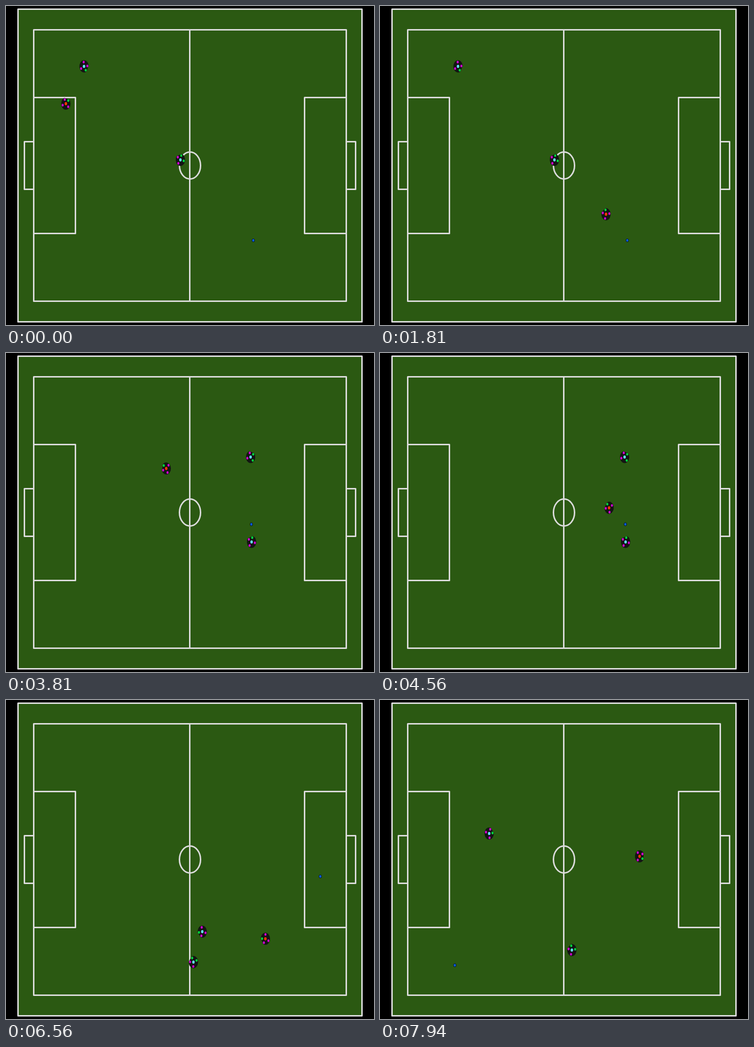
Recreate the animation shown at these times as an HTML page with a canvas. Size 750x650 px, loop 8 s.

```html
<!DOCTYPE html>
<html lang="en">
<head>
<meta charset="utf-8">
<title>Robot soccer</title>
<style>
  html, body { margin: 0; width: 100%; height: 100%; overflow: hidden; background: #000; }
  canvas { display: block; }
</style>
</head>
<body>
<canvas width="750" height="650"></canvas>
<script>
const ctx = document.querySelector('canvas').getContext('2d');
const LOOP = 8000, STEP = 62.5, EPISODE_STEPS = 39;
const WIDTH = 750, HEIGHT = 650, CENTER_X = 375, CENTER_Y = 325;
const ROBOT_RADIUS = 9.5, Y_STRETCH = 1.3;
const RED = '#ff3800', CYAN = '#62e4fa', MAGENTA = '#d000d0', GREEN = '#00d83c';
const FRONT = 32.6, BACK = 122.6; // marker angles from the heading, in degrees

// The red robot drives along a cubic Bezier curve while it turns between two headings.
const episodes = [
  { ball: [504, 477.5], curve: [[122, 199], [220, 342], [444, 361], [516, 485]], turn: [283, 212],
    oneGreen: [159, 123, 27], twoGreen: [355.5, 313.5, 251] },
  { ball: [500, 349], curve: [[75.5, 156], [225, 205], [348, 216], [497, 339]], turn: [162, 210],
    oneGreen: [500.5, 385, 249], twoGreen: [498.5, 212, 288] },
  { ball: [640.5, 359.5], curve: [[155, 568], [334, 608], [499, 569], [633, 364]], turn: [163, 143],
    oneGreen: [400, 472, 138], twoGreen: [382, 534, 215] },
  { ball: [152.5, 540.5], curve: [[598.5, 263], [492, 348], [385, 434], [279, 519]], turn: [0, 0],
    oneGreen: [222.5, 272, 321], twoGreen: [391, 509.5, 227] },
];

const mix = (a, b, u) => a + (b - a) * u;
const drive = u => mix(u, u * u * (3 - 2 * u), 0.5); // gentle start and stop

// De Casteljau: blend neighbouring points until one is left.
function pointOn(points, u) {
  if (points.length === 1) return points[0];
  const blended = points.slice(1).map(([x, y], i) => [mix(points[i][0], x, u), mix(points[i][1], y, u)]);
  return pointOn(blended, u);
}

function dot(x, y, radius, color) {
  ctx.fillStyle = color;
  ctx.beginPath();
  ctx.arc(x, y, radius, 0, 2 * Math.PI);
  ctx.fill();
}

function drawRobot([x, y, heading], center, greens) {
  const rad = degrees => (heading + degrees) * Math.PI / 180;
  ctx.save();
  ctx.translate(x, y);
  ctx.scale(1, Y_STRETCH);
  ctx.fillStyle = '#141414';
  ctx.beginPath();
  ctx.arc(0, 0, ROBOT_RADIUS, rad(FRONT), rad(-FRONT)); // flat front
  ctx.fill();
  [FRONT, BACK, -BACK, -FRONT].forEach((angle, i) => {
    const reach = ROBOT_RADIUS * 0.72;
    dot(reach * Math.cos(rad(angle)), reach * Math.sin(rad(angle)), 2.1, i < greens ? GREEN : MAGENTA);
  });
  dot(0, 0, 2.5, center);
  ctx.restore();
}

function drawBall([x, y]) {
  ctx.save();
  ctx.translate(x, y);
  ctx.scale(1, 1.2);
  dot(0, 0, 3, '#06142a');
  dot(0, 0, 2.2, '#0a5ce0');
  ctx.restore();
}

function drawField() {
  ctx.fillStyle = '#000';
  ctx.fillRect(0, 0, WIDTH, HEIGHT);
  ctx.fillStyle = '#2b5912';
  ctx.fillRect(24, 6, 702, 638);
  ctx.strokeStyle = '#dcdcdc';
  ctx.lineWidth = 3;
  ctx.lineJoin = 'round';
  ctx.beginPath();
  ctx.rect(24.5, 6.5, 701, 637);
  ctx.rect(56.5, 48.5, 637, 553);
  for (const [depth, height] of [[85, 277], [19, 97]]) {
    const top = CENTER_Y - height / 2;
    const goal = depth === 19;
    ctx.rect(goal ? 56.5 - depth : 56.5, top, depth, height);
    ctx.rect(goal ? 693.5 : 693.5 - depth, top, depth, height);
  }
  ctx.moveTo(374.5, 48.5);
  ctx.lineTo(374.5, 601.5);
  ctx.stroke();
  ctx.beginPath();
  ctx.ellipse(CENTER_X, CENTER_Y, 21.5, 27.5, 0, 0, 2 * Math.PI);
  ctx.stroke();
}

function draw(time) {
  const frame = Math.min(127, Math.floor((time % LOOP + 5) / STEP));
  const { ball, curve, turn, oneGreen, twoGreen } = episodes[Math.floor(frame / EPISODE_STEPS)];
  const progress = frame % EPISODE_STEPS / (EPISODE_STEPS - 1);
  drawField();
  drawBall(ball);
  drawRobot(oneGreen, CYAN, 1);
  drawRobot(twoGreen, CYAN, 2);
  drawRobot([...pointOn(curve, drive(progress)), mix(...turn, progress)], RED, 1);
}

const start = performance.now();
function tick() {
  draw(performance.now() - start);
  requestAnimationFrame(tick);
}
tick();
</script>
</body>
</html>
```
